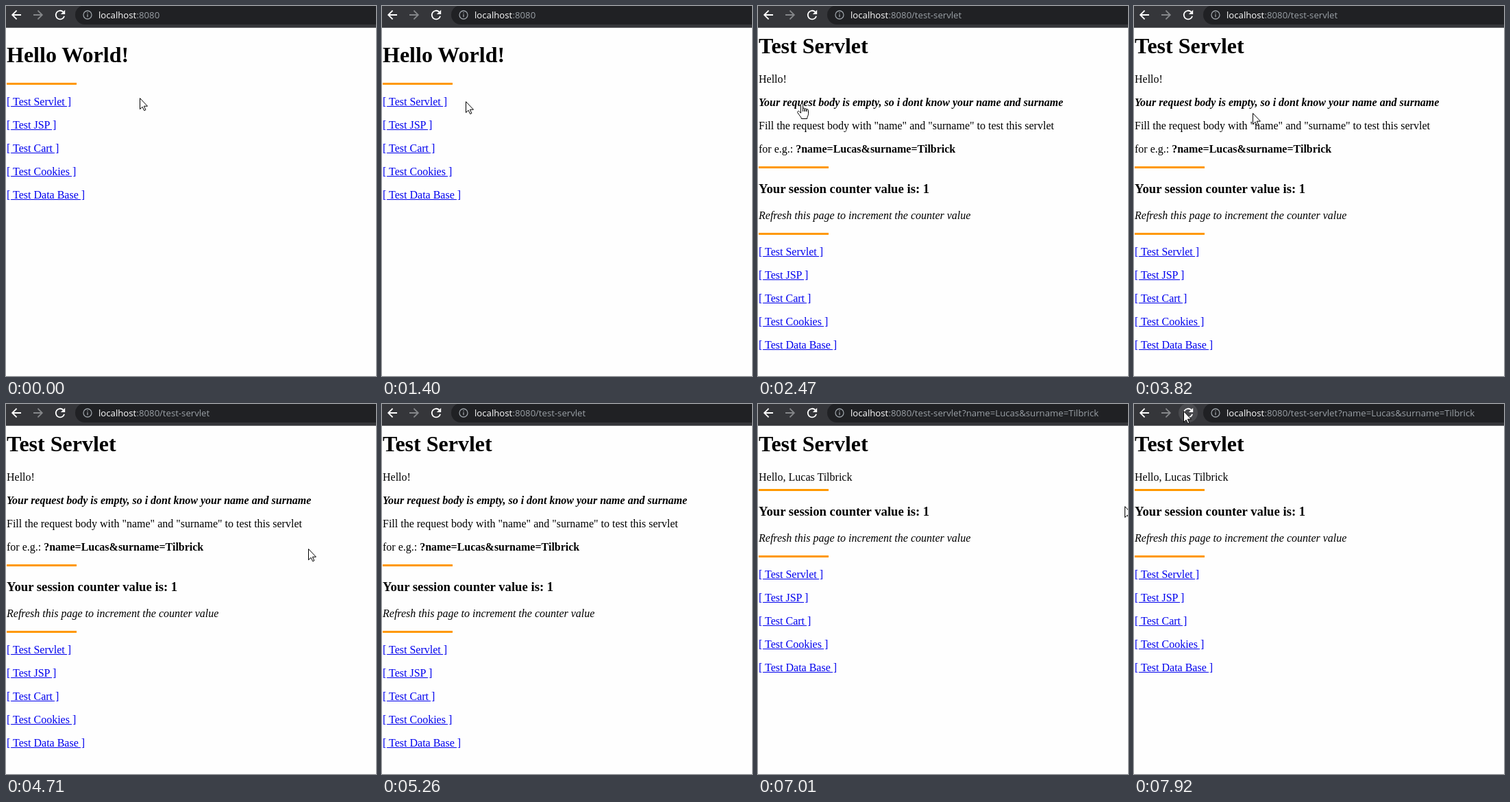
Write an HTML page that moves like this. It is 540 px wide and 540 px high and loops after 8000 ms.

```html
<!DOCTYPE html>
<html lang="en">
<head>
<meta charset="utf-8">
<title>Test Servlet</title>
<style>
html, body { margin: 0; width: 100%; height: 100%; overflow: hidden; background: #fff; }
#stage { position: relative; width: 540px; height: 540px; overflow: hidden; background: #fefefe; }
#stage div, #stage > svg { position: absolute; white-space: pre; }
.page { inset: 0; font: 16px/17px "Liberation Serif", "Times New Roman", serif; color: #000; }
.page div { left: 1px; }
.page .h1 { font: bold 32px/36px "Liberation Serif", serif; }
.page .h3 { font: bold 18.72px/21px "Liberation Serif", serif; }
.page .bar { width: 102px; height: 3px; background: #ff9800; }
.page .link { color: #00e; text-decoration: underline; }
.url { top: 4px; font: 13.2px/18px "Open Sans", "Noto Sans", sans-serif; color: #9aa0a6; }
svg { left: 0; top: 0; overflow: visible; }
#cursor { fill: #fff; stroke: #000; stroke-linejoin: round; }
</style>
</head>
<body>
<div id="stage">
  <svg width="540" height="32" fill="none">
    <rect width="540" height="31" fill="#35363a"/>
    <rect y="31" width="540" height="1" fill="#66676a"/>
    <rect x="101" y="-1" width="480" height="28" rx="14" fill="#202124"/>
    <circle id="hover" cx="79" cy="13" r="14" fill="#fff" fill-opacity=".1"/>
    <g stroke="#fff" stroke-width="1.8">
      <path id="back" d="M22 13H9M15.6 6.6 9.2 13l6.4 6.4"/>
      <path d="M85.1 14.8A6.3 6.3 0 1 1 83.4 8.5"/>
      <path d="M86.2 5.8v6.3h-6.3z" fill="#fff" stroke="none"/>
    </g>
    <path d="M40 13h13M46.4 6.6 52.8 13l-6.4 6.4" stroke="#85878a" stroke-width="1.8"/>
    <g stroke="#9aa0a6" stroke-width="1.3">
      <circle cx="119" cy="13" r="6"/>
      <path d="M119 9.3v1.5M119 12v4.3"/>
    </g>
  </svg>
  <div class="url" style="left:135px;color:#fff">localhost</div>
  <div class="url" style="left:190.5px">:8080</div>
  <div class="url" id="path" style="left:224px">/test-servlet</div>
  <div class="url" id="query" style="left:298px">?name=Lucas&amp;surname=Tilbrick</div>

  <div class="page" id="home"></div>
  <div class="page" id="empty"></div>
  <div class="page" id="named"></div>

  <svg id="cursor" width="17" height="23">
    <path id="arrow" d="M.5.6V16.6L4.1 13.2 6.7 18.6 8.9 17.6 6.4 12.2H11.5Z"/>
    <path id="hand" d="M8.5 12V2.2C8.5 0 5.5 0 5.5 2.2V14.2L3.6 12.2C2.3 10.6-.1 11.6.9 13.7 2.8 17.3 6.3 20 6.4 22.5H14.6C14.6 19.5 16.5 18 16.5 15.5V10.3C16.5 8.4 14 8.2 13.9 9.2V12 9.2C13.9 7.3 11.3 7.2 11.2 8.5V12 8.5C11.2 6.6 8.5 6.6 8.5 8.2"/>
  </svg>
</div>
<script>
const LOOP = 8000, TICK = 125;
const LINE = 34;          // pitch of the paragraphs
const TOP = 112;          // baseline of the first paragraph
const ASCENT = { h1: 29, h3: 17, bar: 0 };
const $ = id => document.getElementById(id);

// Adds one row; y is the baseline, or the top edge of a bar.
function row(page, y, html, kind = "text") {
  const el = document.createElement("div");
  el.className = kind;
  el.innerHTML = html;
  el.style.top = y - (ASCENT[kind] ?? 14) + "px";
  $(page).append(el);
  return el;
}

function menu(page, y) {
  row(page, y, "", "bar");
  return ["Servlet", "JSP", "Cart", "Cookies", "Data Base"]
    .map((name, i) => row(page, y + 33 + LINE * i, `[ Test ${name} ]`, "link"));
}

function servletPage(page, lines) {
  row(page, 69, "Test Servlet", "h1");
  lines.forEach((html, i) => row(page, TOP + LINE * i, html));
  const y = TOP + LINE * (lines.length - 1);
  const bar = y + (lines.length > 1 ? 20 : 12);
  row(page, bar, "", "bar");
  row(page, bar + 39, "Your session counter value is: 1", "h3");
  row(page, bar + 77, "<i>Refresh this page to increment the counter value</i>");
  menu(page, bar + 97);
}

row("home", 82, "Hello World!", "h1");
const [servlet] = menu("home", TOP);
servletPage("empty", [
  "Hello!",
  "<b><i>Your request body is empty, so i dont know your name and surname</i></b>",
  'Fill the request body with "name" and "surname" to test this servlet',
  "for e.g.: <b>?name=Lucas&amp;surname=Tilbrick</b>"
]);
servletPage("named", ["Hello, Lucas Tilbrick"]);

// Holds each value until the next [time, value] step.
function hold(el, prop, steps) {
  const all = [...steps, [LOOP, steps.at(-1)[1]]];
  el.animate(
    all.map(([t, v]) => ({ offset: t / LOOP, [prop]: v, easing: "step-end" })),
    { duration: LOOP, iterations: Infinity });
}

function show(id, from, to = LOOP) {
  const steps = [[from, 1]];
  if (from > 0) steps.unshift([0, 0]);
  if (to < LOOP) steps.push([to, 0]);
  hold($(id), "opacity", steps);
}

const CLICK = 2350, LOADED = 2470, SENT = 5530;
const OVER = 1505, OFF = 3820, LEAVE = 5235, ENTER = 7005;

show("home", 0, LOADED);
show("empty", LOADED, SENT);
show("named", SENT);
show("path", LOADED);
show("query", SENT);
show("hover", 7795);
show("hand", OVER, OFF);
hold($("arrow"), "opacity", [[0, 1], [OVER, 0], [OFF, 1], [LEAVE, 0], [ENTER, 1]]);
hold(servlet, "color", [[0, "#0000ee"], [CLICK, "#ff0000"]]);

// Mouse strokes, eased and sampled once per tick: start, ticks, from, to.
const strokes = [
  [0, 0, [195, 134], [195, 134]],
  [1130, 4, [187, 135], [57, 142]],
  [OFF, 3, [173, 156], [441, 208]],
  [4710, 3, [441, 211], [452, 529]],
  [ENTER, 1, [535, 149], [464, 151]],
  [ENTER + TICK, 4, [464, 151], [92, 19]],
  [7670, 2, [92, 19], [72, 10]]
];
const ease = p => p * p * (3 - 2 * p);
const trail = strokes.flatMap(([start, ticks, from, to]) =>
  Array.from({ length: ticks + 1 }, (_, k) => {
    const p = ease(k / (ticks || 1));
    const [x, y] = from.map((a, i) => Math.round(a + (to[i] - a) * p));
    return [start + k * TICK, `translate(${x}px, ${y}px)`];
  }));
hold($("cursor"), "transform", trail);
</script>
</body>
</html>
```
